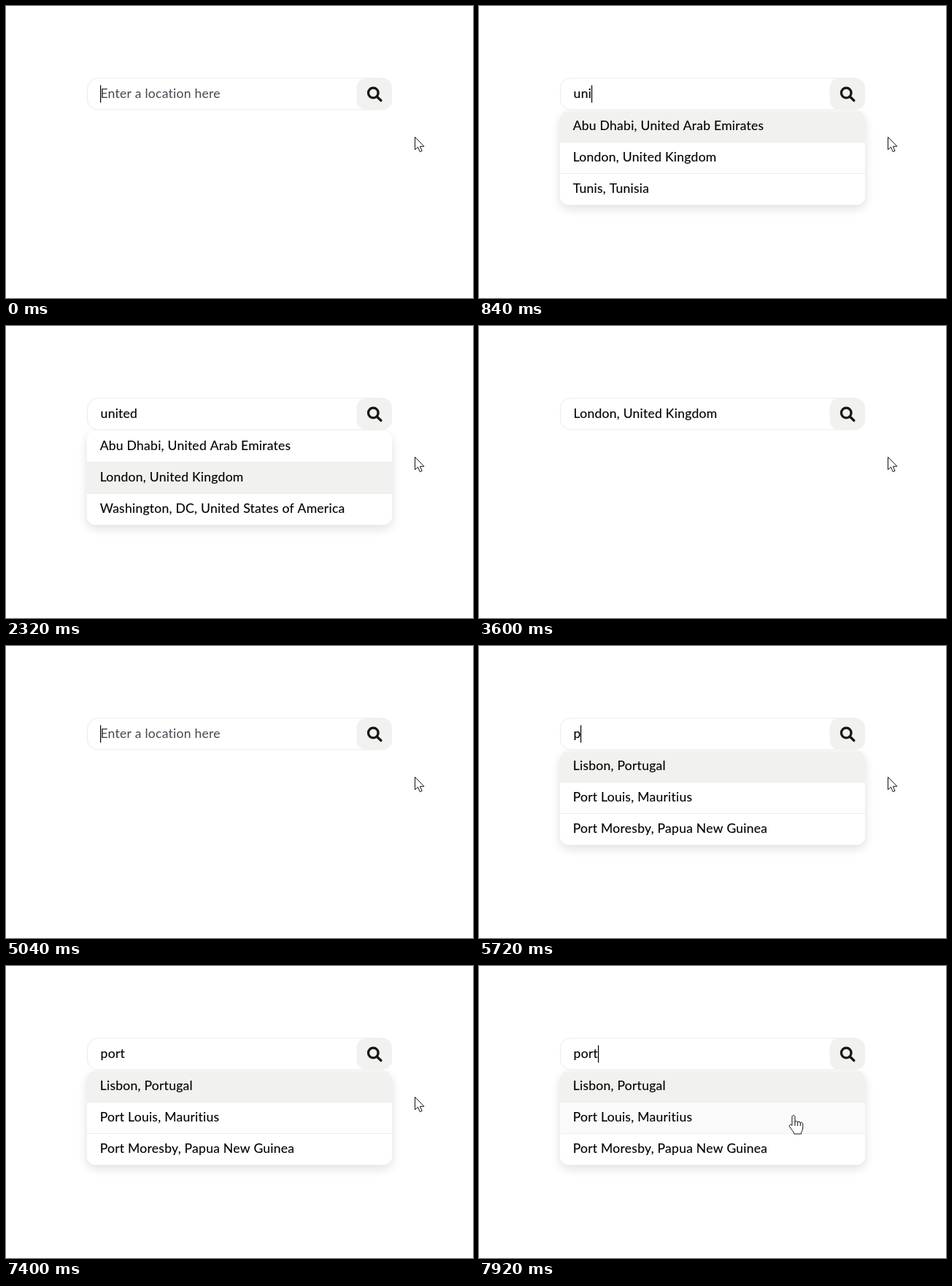
Animation of 640 by 400 pixels, one loop 8 s. Source, as an HTML page with a canvas:

```html
<!DOCTYPE html>
<html lang="en">
<head>
<meta charset="utf-8">
<title>Location search</title>
<style>
  html, body { margin: 0; width: 100%; height: 100%; overflow: hidden; background: #fff; }
  canvas { display: block; width: 640px; height: 400px; }
</style>
</head>
<body>
<canvas id="stage" width="640" height="400"></canvas>
<script>
const ctx = document.getElementById('stage').getContext('2d');
const LOOP = 8000;
const BOX = { x: 111, y: 98.5, w: 418, h: 44 };
const LIST = { x: 111, y: 143.5, w: 418, row: 43 };

const UNI = ['Abu Dhabi, United Arab Emirates', 'London, United Kingdom', 'Tunis, Tunisia'];
const UNITED = [UNI[0], UNI[1], 'Washington, DC, United States of America'];
const POR = ['Lisbon, Portugal', 'Port Louis, Mauritius', 'Port Moresby, Papua New Guinea'];

// [time, input value, suggestions]
const INPUT = [
  [0, ''],
  [520, 'u', UNI], [720, 'un', UNI], [840, 'uni', UNI],
  [920, 'unit', UNITED], [1080, 'unite', UNITED], [1200, 'united', UNITED],
  [2680, UNI[1]],
  [5040, ''],
  [5720, 'p', POR], [5880, 'po', POR], [6000, 'por', POR], [6200, 'port', POR]
];
// [time, active row]
const ACTIVE = [[-999, 0], [1440, 1], [1800, 2], [2120, 1], [2680, 0]];
const SELECT_ALL = [4720, 5040];
const CARET_FLIPS = [160, 520, 1640, 1960, 2320, 3160, 3600, 4000,
                     4440, 5040, 5320, 5720, 6600, 7000, 7400, 7800];

const ARROW = new Path2D('M0 0V17.3L4 13.7L6.8 20.2L9.6 19L6.9 12.8H12.4Z');
const HAND = new Path2D('M-2 13.5V1.5C-2-1 2-1 2 1.5V9C2 7 5.7 7 5.7 9.5' +
  'C5.7 7.6 9.4 7.8 9.4 10.2C9.4 8.6 12.8 9 12.8 11.4V17C12.8 20 10.8 21 10.5 25' +
  'H0.8C0.5 22-3 19-5.4 15C-6.6 12.6-3.8 11.2-2 13.5Z');
const KNUCKLES = new Path2D('M2 9V14M5.7 9.5V14M9.4 10.2V14');

const clamp = v => Math.max(0, Math.min(1, v));
const mix = (a, b, p) => a + (b - a) * p;
const lastIndex = (list, t) => list.findLastIndex(e => t >= e[0]);

function roundRect(x, y, w, h, r) {
  ctx.beginPath();
  ctx.roundRect(x, y, w, h, r);
}

function text(str, x, y, color, bold = 0.12) {
  ctx.fillStyle = ctx.strokeStyle = color;
  ctx.lineWidth = bold;
  ctx.fillText(str, x, y);
  if (bold) ctx.strokeText(str, x, y);
}

function drawButton() {
  ctx.fillStyle = '#f1f1ef';
  roundRect(480.5, 98.5, 48.5, 44, 14);
  ctx.fill();
  ctx.strokeStyle = '#161616';
  ctx.lineWidth = 3.3;
  ctx.beginPath();
  ctx.arc(503.3, 119, 6.8, 0, Math.PI * 2);
  ctx.stroke();
  ctx.lineWidth = 3.4;
  ctx.lineCap = 'round';
  ctx.beginPath();
  ctx.moveTo(509, 124.7);
  ctx.lineTo(513.9, 129.4);
  ctx.stroke();
  ctx.lineCap = 'butt';
}

function drawInput(value, t) {
  ctx.fillStyle = '#fff';
  ctx.strokeStyle = '#ebebea';
  ctx.lineWidth = 1;
  roundRect(BOX.x + 0.5, BOX.y + 0.5, BOX.w - 1, BOX.h - 1, 14);
  ctx.fill();
  ctx.stroke();
  drawButton();

  const width = ctx.measureText(value).width;
  const selected = t >= SELECT_ALL[0] && t < SELECT_ALL[1];
  if (selected) {
    ctx.fillStyle = '#0078d7';
    ctx.fillRect(129, 108, width, 25);
  }
  if (value) text(value, 129.6, 126, selected ? '#fff' : '#000');
  else text('Enter a location here', 129.4, 126, '#434a50', 0);

  if (CARET_FLIPS.filter(f => t >= f).length % 2 === 0) {
    ctx.fillStyle = '#000';
    ctx.fillRect(Math.round(129.4 + width), 108.5, 1.2, 24);
  }
}

function drawList(rows, pointer, t) {
  const { x, y, w, row } = LIST;
  const i = lastIndex(ACTIVE, t);
  const [start, now] = ACTIVE[i];
  const before = i ? ACTIVE[i - 1][1] : now;
  const p = t < 2680 ? clamp((t - start + 20) / 120) : 1;

  ctx.save();
  ctx.shadowColor = 'rgba(0,0,0,0.13)';
  ctx.shadowBlur = 14;
  ctx.shadowOffsetY = 5;
  ctx.fillStyle = '#fff';
  roundRect(x, y, w, row * 3, 12);
  ctx.fill();
  ctx.restore();

  ctx.save();
  roundRect(x, y, w, row * 3, 12);
  ctx.clip();
  rows.forEach((label, n) => {
    const top = y + n * row;
    const hover = pointer.x < x + w && pointer.y >= top && pointer.y < top + row;
    const glow = n === now ? p : n === before ? 1 - p : 0;
    const shade = Math.round(mix(hover ? 250 : 255, 241, glow));
    ctx.fillStyle = `rgb(${shade},${shade},${shade - Math.round(2 * glow)})`;
    ctx.fillRect(x, top, w, row);
    if (n) {
      ctx.fillStyle = '#eeeeee';
      ctx.fillRect(x, top - 0.5, w, 1);
    }
  });
  ctx.restore();
  rows.forEach((label, n) => text(label, 128.7, 170 + n * row, '#000'));
}

function pointerAt(t) {
  const p = clamp((t - 7420) / 500);
  const e = p * p * (3 - 2 * p);
  return { x: mix(560.5, 431, e), y: mix(179.5, 205, e) };
}

function drawPointer({ x, y }, hand) {
  ctx.save();
  ctx.translate(x, y);
  ctx.fillStyle = '#fff';
  ctx.strokeStyle = '#111';
  ctx.lineWidth = 1;
  ctx.lineJoin = 'round';
  const shape = hand ? HAND : ARROW;
  ctx.fill(shape);
  ctx.stroke(shape);
  if (hand) ctx.stroke(KNUCKLES);
  ctx.restore();
}

function draw(t) {
  const [, value, rows] = INPUT[lastIndex(INPUT, t)];
  const pointer = pointerAt(t);
  ctx.fillStyle = '#fff';
  ctx.fillRect(0, 0, 640, 400);
  ctx.font = '17.6px Lato, "Open Sans", sans-serif';
  ctx.letterSpacing = '0.22px';
  ctx.lineJoin = 'round';
  if (rows) drawList(rows, pointer, t);
  drawInput(value, t);
  drawPointer(pointer, rows && pointer.x < LIST.x + LIST.w);
}

const begin = performance.now();
function tick() {
  draw((performance.now() - begin) % LOOP);
  requestAnimationFrame(tick);
}
tick();
</script>
</body>
</html>
```
